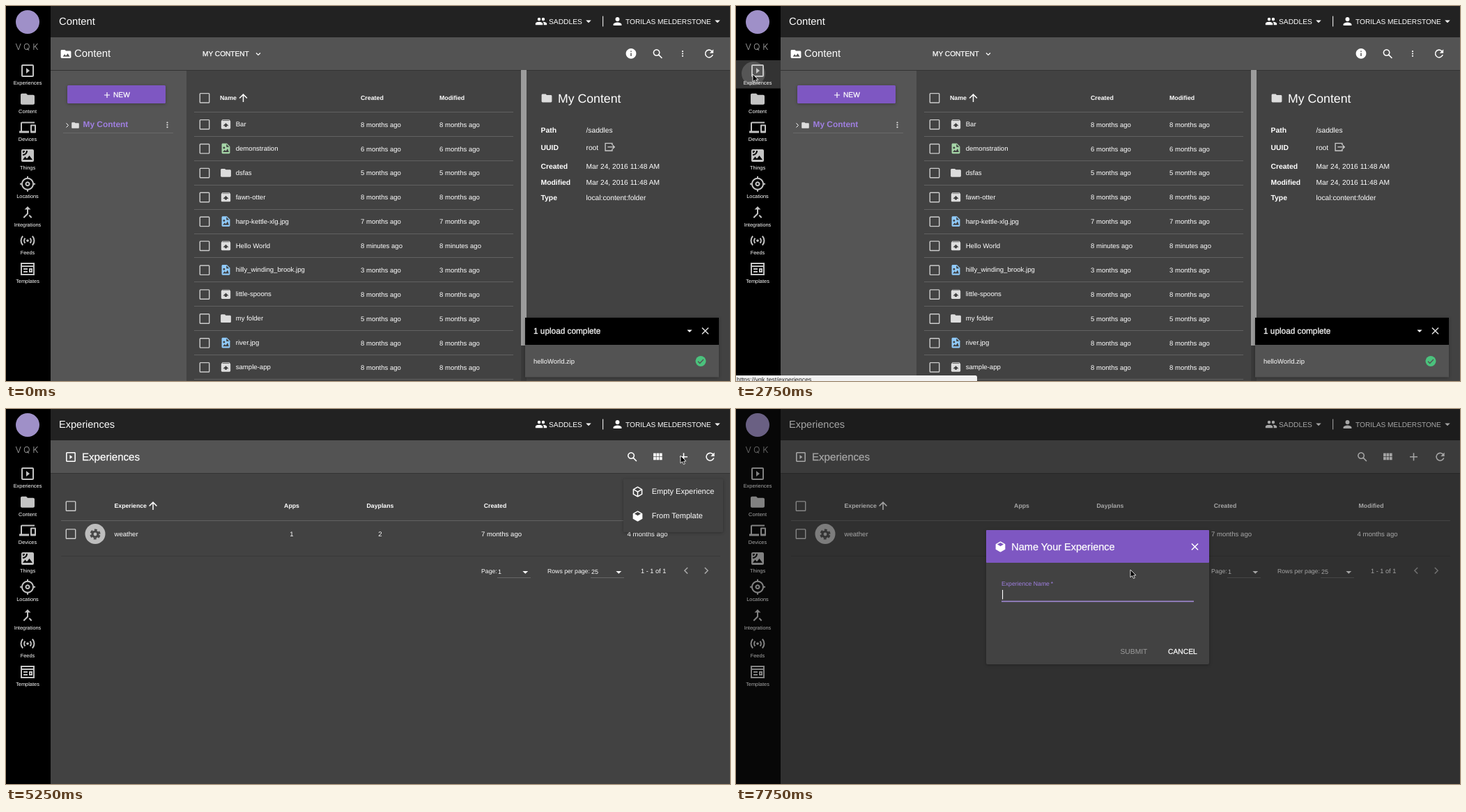
Recreate the animation shown at these times as an HTML page. Size 1039 px wide and 539 px high, loop 8 s.

```html
<!DOCTYPE html>
<html lang="en">
<head>
<meta charset="utf-8">
<title>Content manager</title>
<style>
  html, body { margin: 0; width: 100%; height: 100%; overflow: hidden; background: #424242; }
  svg { display: block; width: 1039px; height: 539px; }
  text { font-family: "Liberation Sans", Arial, sans-serif; text-rendering: geometricPrecision; white-space: pre; }
  .lift { filter: drop-shadow(0 1.5px 2px rgba(0, 0, 0, .3)); }
</style>
</head>
<body>
<svg id="stage" viewBox="0 0 1039 539"></svg>
<script>
const PURPLE = '#7e57c2', LILAC = '#9f7fe0', BASE = '#424242', BAR = '#535353', LINE = '#616161';

// Icons on a 24 unit grid, filled
const hex = 'M21 16.5c0 .4-.2.7-.5.9l-7.9 4.4a1 1 0 0 1-1.2 0l-7.9-4.4a1 1 0 0 1-.5-.9v-9c0-.4.2-.7.5-.9l7.9-4.4a1 1 0 0 1 1.2 0l7.9 4.4c.3.2.5.5.5.9zM12 4.2L6 7.5l6 3.4 6-3.4z';
const solid = {
  folder: 'M10 4H4c-1.1 0-2 .9-2 2v12c0 1.1.9 2 2 2h16c1.1 0 2-.9 2-2V8c0-1.1-.9-2-2-2h-8z',
  play: 'M10 8v8l5-4zM19 3H5c-1.1 0-2 .9-2 2v14c0 1.1.9 2 2 2h14c1.1 0 2-.9 2-2V5c0-1.1-.9-2-2-2zm0 16H5V5h14z',
  devices: 'M4 6h18V4H4c-1.1 0-2 .9-2 2v11H0v3h14v-3H4zM23 8h-6c-.5 0-1 .5-1 1v10c0 .5.5 1 1 1h6c.5 0 1-.5 1-1V9c0-.5-.5-1-1-1zm-1 9h-4v-7h4z',
  things: 'M19 3H5c-1.1 0-2 .9-2 2v14c0 1.1.9 2 2 2h14c1.1 0 2-.9 2-2V5c0-1.1-.9-2-2-2zM5 5h3a3 3 0 0 1-3 3zM5 12v-2a5 5 0 0 0 5-5h2a7 7 0 0 1-7 7zM5 18l3.5-4.5 2.5 3 3.5-4.5 4.5 6z',
  merge: 'M17 20.4l1.4-1.4L15 15.6 13.6 17zM7.5 8H11v5.6L5.6 19 7 20.4l6-6V8h3.5L12 3.5z',
  group: 'M16 11a3 3 0 1 0 0-6 3 3 0 0 0 0 6zM8 11a3 3 0 1 0 0-6 3 3 0 0 0 0 6zM8 13c-2.3 0-7 1.2-7 3.5V19h14v-2.5C15 14.2 10.3 13 8 13zM16 13l-1 .1c1.2.8 2 1.9 2 3.4V19h6v-2.5c0-2.3-4.7-3.5-7-3.5z',
  person: 'M12 12a4 4 0 1 0 0-8 4 4 0 0 0 0 8zM12 14c-2.7 0-8 1.3-8 4v2h16v-2c0-2.7-5.3-4-8-4z',
  info: 'M12 2a10 10 0 1 0 .01 0zM11 11h2v6h-2zM11 7h2v2h-2z',
  more: 'M12 4a2 2 0 1 0 .01 0zM12 10a2 2 0 1 0 .01 0zM12 16a2 2 0 1 0 .01 0z',
  grid: 'M4 5h5v6H4zM10 5h5v6h-5zM16 5h5v6h-5zM4 12h5v6H4zM10 12h5v6h-5zM16 12h5v6h-5z',
  refresh: 'M17.65 6.35A8 8 0 1 0 19.73 14h-2.08A6 6 0 1 1 16.2 7.8L13 11h7V4z',
  box: 'M20.5 5.2l-1.4-1.7C18.9 3.2 18.5 3 18 3H6c-.5 0-.9.2-1.2.5L3.5 5.2C3.2 5.6 3 6 3 6.5V19c0 1.1.9 2 2 2h14c1.1 0 2-.9 2-2V6.5c0-.5-.2-.9-.5-1.3zM12 9.5l5.5 5.5H14v2h-4v-2H6.5zM5.1 5l.8-1h12l1 1z',
  sheet: 'M14 2H6c-1.1 0-2 .9-2 2v16c0 1.1.9 2 2 2h12c1.1 0 2-.9 2-2V8z',
  scene: 'M6 19l3.5-4.5 2.5 2.5 3.5-5 2.5 7zM8.5 8.5a2 2 0 1 0 .01 0zM13 3.5V9h5.5z',
  hills: 'M6 17l3.5-4.5 2.5 3 3.5-4.5 4 6z',
  caret: 'M6 9.5l6 6 6-6z',
  cube: hex,
  cubeLine: hex + 'M5 15.9l6 3.4v-6.7L5 9.2zM19 15.9V9.2l-6 3.4v6.7z'
};
// Icons drawn with a 2 unit stroke
const lined = {
  target: 'M12 4a8 8 0 1 0 .01 0zM12 9.5a2.5 2.5 0 1 0 .01 0zM12 1v3M12 20v3M1 12h3M20 12h3M12 12h.1',
  feeds: 'M8.5 8.5a5 5 0 0 0 0 7M15.5 8.5a5 5 0 0 1 0 7M5.2 5.5a9.2 9.2 0 0 0 0 13M18.8 5.5a9.2 9.2 0 0 1 0 13M12 11.2a.8.8 0 1 0 .01 0z',
  template: 'M3 4h18v16H3zM3 8h18M6 12h6M6 16h6M15 12h3v4h-3z',
  search: 'M9.5 4a5.5 5.5 0 1 0 .01 0zM13.5 13.5l6.2 6.2',
  plus: 'M12 5v14M5 12h14',
  close: 'M6 6l12 12M18 6L6 18',
  up: 'M12 20V5.5M4.7 12.7L12 5.4l7.3 7.3',
  down: 'M7 9.5l5 5 5-5',
  left: 'M15 6l-6 6 6 6',
  right: 'M9 6l6 6-6 6',
  exit: 'M18 8V4H3v16h15v-4M8 12h15M19 8l4 4-4 4',
  check: 'M6.5 12.5l3.7 3.7 7.3-7.6'
};

const icon = (name, x, y, s = .74, color = '#fff') => {
  const paint = solid[name] ? `fill="${color}" fill-rule="evenodd"` : `fill="none" stroke="${color}" stroke-width="2"`;
  return `<path d="${solid[name] || lined[name]}" ${paint} transform="translate(${x} ${y}) scale(${s}) translate(-12 -12)"/>`;
};
const rect = (x, y, w, h, fill, more = '') => `<rect x="${x}" y="${y}" width="${w}" height="${h}" fill="${fill}" ${more}/>`;
const rule = (x1, x2, y, color = LINE, w = 1) => rect(x1, y - w / 2, x2 - x1, w, color);
const text = (x, y, str, size, color = '#fff', more = '') =>
  `<text x="${x}" y="${y}" font-size="${size}" fill="${color}" ${more}>${str}</text>`;
const BOLD = 'font-weight="700" ', MID = 'text-anchor="middle" ', MEDIUM = 'stroke="#fff" stroke-width=".25"';
const tick = (x, y) => rect(x - 6.7, y - 6.4, 13.4, 13.4, 'none', 'stroke="#ccc" stroke-width="1.4" rx=".8"');
const group = (id, body) => `<g id="${id}">${body}</g>`;

function frameBars() {
  const items = [['Experiences', 'play'], ['Content', 'folder'], ['Devices', 'devices'], ['Things', 'things'],
    ['Locations', 'target'], ['Integrations', 'merge'], ['Feeds', 'feeds'], ['Templates', 'template']];
  return rect(64, 0, 975, 45, '#222') + rect(64, 45, 975, 47, BAR) + rule(64, 1039, 92.5, '#333') +
    rect(0, 0, 64, 539, '#000') +
    group('hover', rect(0, 78, 64, 40.5, '#333') + '<circle id="ripple" cx="25" cy="97" r="17" fill="#565656"/>') +
    '<circle cx="31" cy="23" r="17" fill="#9f90c8"/>' +
    text(13.5, 62.5, 'VQK', 12.5, '#aaa', 'style="font-family:Inter,sans-serif;font-weight:300;letter-spacing:3.6px"') +
    items.map(([label, name], i) => icon(name, 31, 93 + i * 40.7, 1, '#c4c4c4') +
      text(31, 113 + i * 40.7, label, 7.4, '#fff', MID)).join('') +
    icon('group', 768, 22) + text(779, 25.6, 'SADDLES', 10.25) + icon('caret', 836, 22, .62) +
    rule(856, 857.2, 22, '#ddd', 15) +
    icon('person', 877.5, 22) + text(889, 25.6, 'TORILAS MELDERSTONE', 10.15) + icon('caret', 1021, 22, .62);
}

function contentPage() {
  const files = [['Bar', 'box', '8 months'], ['demonstration', 'green', '6 months'], ['dsfas', 'folder', '5 months'],
    ['fawn-otter', 'box', '8 months'], ['harp-kettle-xlg.jpg', 'blue', '7 months'], ['Hello World', 'box', '8 minutes'],
    ['hilly_winding_brook.jpg', 'blue', '3 months'], ['little-spoons', 'box', '8 months'],
    ['my folder', 'folder', '5 months'], ['river.jpg', 'blue', '8 months'], ['sample-app', 'box', '8 months']];
  const tint = { green: '#a5d6a7', blue: '#90caf9' };
  const fileIcon = (kind, y) => tint[kind]
    ? icon('sheet', 315.5, y, .74, tint[kind]) + icon('scene', 315.5, y, .74, BASE)
    : icon(kind, 315.5, y, .74, '#ddd');
  const row = ([name, kind, age], i) => {
    const y = 170 + i * 34.9;
    return tick(285, y) + fileIcon(kind, y) + text(329.7, y + 3, name, 9.6) +
      [509, 622].map(x => text(x, y + 3.6, age + ' ago', 9.55)).join('') + rule(270, 728, Math.floor(y + 17.4) + .5);
  };
  const details = [['Path', '/saddles', 178], ['UUID', 'root', 203], ['Created', 'Mar 24, 2016 11:48 AM', 230.5],
    ['Modified', 'Mar 24, 2016 11:48 AM', 253], ['Type', 'local:content:folder', 275.5]];

  return text(76, 27, 'Content', 14.8) +
    icon('folder', 86, 69) + icon('hills', 86, 69, .74, BAR) + text(98, 73, 'Content', 14.9) +
    text(282, 72.2, 'MY CONTENT', 10.15, '#fff', MEDIUM) + icon('down', 362, 69, .6) +
    icon('info', 897, 68.3) + icon('search', 935.5, 69, .77) + icon('more', 971, 68.5, .55) + icon('refresh', 1009, 68.5, .77) +
    rect(64, 93, 195, 446, '#555') +
    rect(88, 114, 141, 26, PURPLE, 'rx="1.5" class="lift"') + icon('plus', 145, 128, .58) + text(154, 131, 'NEW', 10.2, '#fff', MEDIUM) +
    icon('right', 88, 171.5, .5) + icon('folder', 99.5, 171.5, .53, '#ddd') +
    text(110.5, 174.4, 'My Content', 11.9, LILAC, BOLD) + icon('more', 231.5, 170.8, .55, '#ddd') + rule(82, 240, 182.5, '#696969') +
    tick(285, 132) + text(307, 134.7, 'Name', 8.8, '#fff', BOLD) + icon('up', 340.5, 132, .74) +
    text(509, 134.7, 'Created', 8.8, '#fff', BOLD) + text(622, 134.7, 'Modified', 8.8, '#fff', BOLD) +
    rule(270, 728, 152.5) + files.map(row).join('') +
    rect(739, 92, 8, 447, '#3a3a3a') + rect(739, 92, 8, 396, '#9c9c9c') +
    icon('folder', 776, 132.5, .74, '#ddd') + text(792, 138.8, 'My Content', 17.7) +
    details.map(([key, value, y]) => text(767.5, y + 3.6, key, 10.4, '#fff', BOLD) + text(832.5, y + 3.6, value, 10.24)).join('') +
    icon('exit', 866, 202.7, .66, '#ccc') +
    `<g class="lift">${rect(745, 448, 278, 40, '#000')}${rect(745, 487, 278, 46.5, BAR)}</g>` +
    text(757, 471, '1 upload complete', 11.8, '#fff', MEDIUM) + icon('caret', 981, 467, .6) + icon('close', 1003.5, 467, .76, '#ddd') +
    text(757, 514.3, 'helloWorld.zip', 9.45) + '<circle cx="997" cy="510.5" r="7.5" fill="#4bc27d"/>' + icon('check', 997, 510.5, .72, BAR);
}

function experiencePage() {
  const heads = [['Apps', 410], ['Dayplans', 537], ['Created', 702], ['Modified', 911.5]];
  const cells = [['1', 410], ['2', 537], ['7 months ago', 711], ['4 months ago', 920.5]];
  const gear = (r, w, dash = '') => `<circle cx="128" cy="180" r="${r}" fill="none" stroke="#484848" stroke-width="${w}" ${dash}/>`;
  const select = (x, value) => text(x + 1, 237, value, 9) + rule(x, x + 48, 242.5, '#666') + icon('caret', x + 40.3, 234.5, .65);
  return text(76, 27, 'Experiences', 14.55) +
    icon('play', 93, 69, .77) + text(109, 74.2, 'Experiences', 15.1, '#fff', MEDIUM) +
    icon('search', 899, 69, .77) + icon('grid', 935, 68.8) + icon('plus', 972.5, 68.8, .78) + icon('refresh', 1010.5, 68.7, .77) +
    tick(93, 139.3) + text(155.5, 142, 'Experience', 8.7, '#fff', BOLD) + icon('up', 211, 139, .74) +
    heads.map(([s, x]) => text(x, 142.2, s, 8.75, '#fff', BOLD + MID)).join('') +
    rule(79, 1025, 160.5) + tick(93, 179.3) +
    '<circle cx="128" cy="179.5" r="14.5" fill="#bdbdbd"/>' +
    gear(4, 3.2) + gear(6.4, 2.4, 'stroke-dasharray="3.8 2.9" stroke-dashoffset="-1.45"') +
    text(155.5, 183, 'weather', 9.6) + cells.map(([s, x]) => text(x, 183.2, s, 9.6, '#fff', MID)).join('') +
    rule(79, 1025, 211.5, '#393939') +
    text(682, 235.5, 'Page:', 8.7) + select(705, '1') + text(777, 235.5, 'Rows per page:', 8.7) + select(839, '25') +
    text(911, 235.5, '1 - 1 of 1', 9.2) + icon('left', 976, 232.3, .72, '#aaa') + icon('right', 1005, 232.3, .72, '#aaa');
}

const menu = () => rect(886, 100.5, 143, 76.5, BASE, 'rx="1.5" class="lift"') +
  rect(886, 101, 143, 35, '#595959', 'id="choice"') +
  icon('cubeLine', 906.5, 119, .76) + text(926.7, 122.3, 'Empty Experience', 11.05) +
  icon('cube', 906.5, 154, .76) + text(926.7, 157.3, 'From Template', 11);

const dialog = () => rect(359, 174, 320, 193, BASE, 'rx="2" class="lift"') + rect(359, 174, 320, 47, PURPLE, 'rx="1"') +
  icon('cube', 379.5, 198, .76) + text(395.3, 203, 'Name Your Experience', 14.5, '#fff', MEDIUM) + icon('close', 658.5, 198, .76) +
  text(381, 253.8, 'Experience Name\u2009*', 8.68, LILAC) + rule(381, 657, 276.5, '#a48bd8', 1.6) + rect(382, 260, 1.1, 13.5, '#fff') +
  text(551.5, 352.3, 'SUBMIT', 10.3, '#9c9c9c') + text(620, 352.3, 'CANCEL', 10.3, '#fff', MEDIUM);

const status = rect(-4, 531, 350, 14, '#f1f1f1', 'rx="2.5"') + text(1, 540, 'https://vqk.test/experiences', 8.9, '#222');

stage.innerHTML = rect(0, 0, 1039, 539, BASE) + frameBars() + group('content', contentPage()) +
  group('experiences', experiencePage()) + group('menu', menu()) + group('status', status) +
  group('dim', rect(0, 0, 1039, 539, 'rgb(20,20,20)')) + group('dialog', dialog()) +
  group('cursor', '<path d="M0 0V11L2.6 8.6 4.4 12.6 6.3 11.8 4.6 8H8Z" fill="#000" stroke="#eee" stroke-width=".9"/>');

// Pointer place at every step
const STEP = 250, LOOP = 8000;
const walk = [null, [772, 222], [590, 115], [380, 60], [215, 130], [154, 195],
  [118, 165], [70, 85], [38, 20], [23, 78], [24, 95], [24, 98],
  [41, 100], [46, 106], [115, 150], [270, 160], [446, 148], [720, 120], [961, 94],
  [1018, 72], [968, 66], [968, 67], [968, 72], [967, 95], [966, 113], [966, 121],
  [966, 121], [966, 121], [966, 121], [895, 142], [720, 190], [566, 231]];
const $ = id => document.getElementById(id);
const show = (id, on) => $(id).style.display = on ? '' : 'none';

function draw(now) {
  const step = Math.floor(now % LOOP / STEP), t = step * STEP, place = walk[step];
  const within = (a, b) => t >= a && t < b;
  show('content', t < 3000);
  show('experiences', t >= 3000);
  show('hover', within(2250, 3000));
  show('ripple', within(2750, 3000));
  show('status', within(2250, 3500));
  show('menu', within(5250, 7000));
  show('choice', t >= 6000);
  show('dim', t >= 7000);
  show('dialog', t >= 7000);
  show('cursor', place);
  if (place) $('cursor').setAttribute('transform', `translate(${place})`);
  const open = t < 7250 ? .55 : 1;
  $('dim').setAttribute('opacity', .38 * open);
  $('dialog').setAttribute('opacity', open);
  $('dialog').setAttribute('transform', `translate(519 271) scale(${open}) translate(-519 -271)`);
  requestAnimationFrame(draw);
}
requestAnimationFrame(draw);
</script>
</body>
</html>
```
